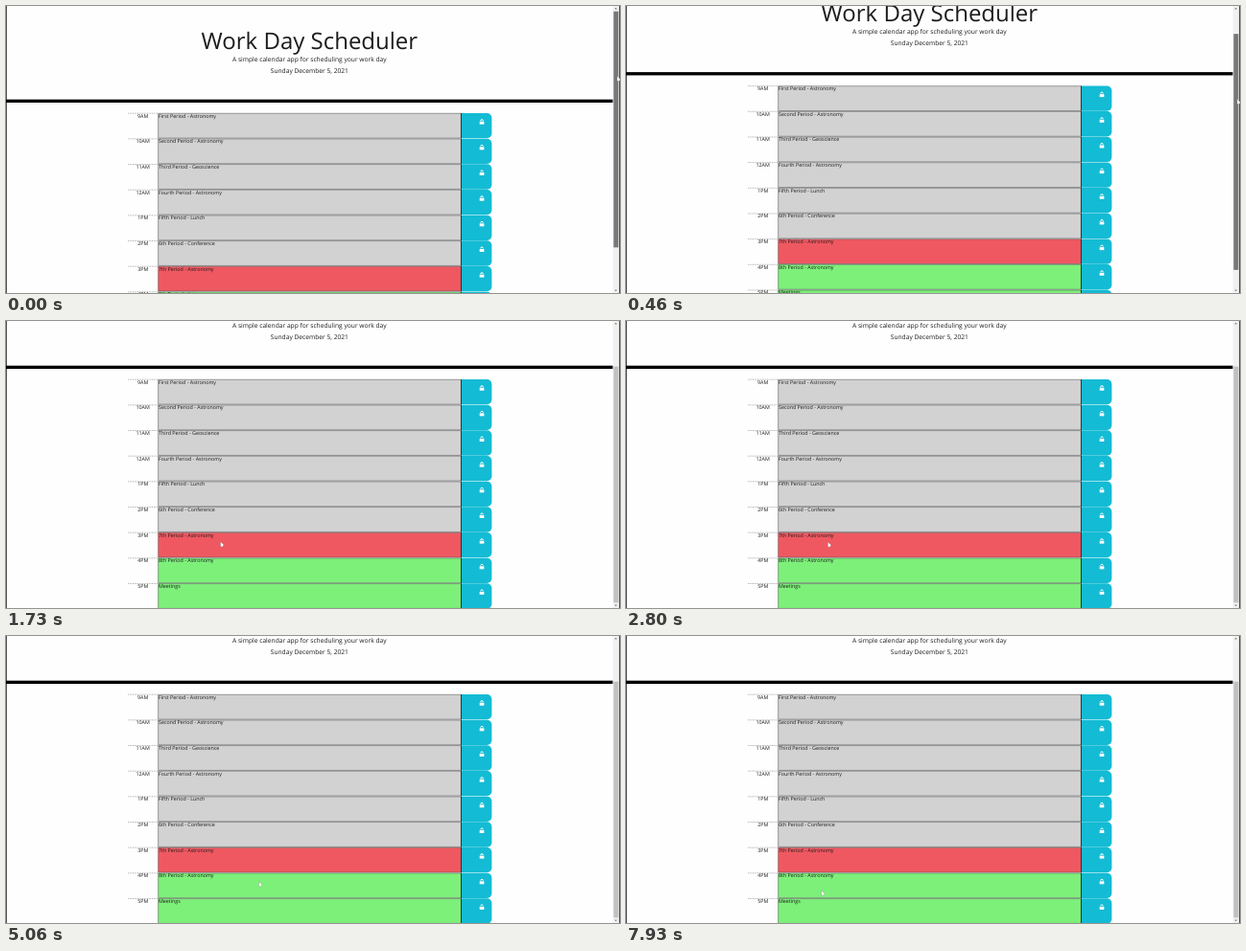
Animation, 640 px wide and 300 px high, one loop 8 s. Source, as an HTML page with a canvas:

```html
<!DOCTYPE html>
<html lang="en">
<head>
<meta charset="utf-8">
<title>Work Day Scheduler</title>
<style>
  html, body { margin: 0; width: 100%; height: 100%; overflow: hidden; background: #fefefe; }
  canvas { display: block; }
</style>
</head>
<body>
<canvas id="stage" width="640" height="300"></canvas>
<script>
// Drawn in the units of a 1920 x 900 screen shown at one third size.
const ctx = document.getElementById('stage').getContext('2d');
ctx.scale(1 / 3, 1 / 3);
ctx.textRendering = 'geometricPrecision';

const LOOP = 8000, VIEW = 900, MAX_SCROLL = 153, ROW = 80, CENTER = 949;
const PAST = '#d2d2d2', PRESENT = '#ef5861', FUTURE = '#7df07a', SAVE = '#14bbd4';
const NOW = 6;

const tasks = [
  'First Period - Astronomy', 'Second Period - Astronomy', 'Third Period - Geoscience',
  'Fourth Period - Astronomy', 'Fifth Period - Lunch', '6th Period - Conference',
  '7th Period - Astronomy', '8th Period - Astronomy', 'Meetings'
];

// The pointer reaches each stop at its time, after at most one TRAVEL.
const TRAVEL = 1300;
const stops = [
  { at: 0, x: 1911, y: 220 },
  { at: 860, x: 1911, y: 350 },
  { at: 1730, x: 671, y: 692 },
  { at: 3730, x: 470, y: 696 },
  { at: 5060, x: 791, y: 770 },
  { at: 5700, x: 1660, y: 650 },
  { at: 6600, x: 980, y: 124 },
  { at: 7900, x: 611, y: 798 }
];

const clamp = v => Math.min(1, Math.max(0, v));
const ease = k => k * k * (3 - 2 * k);

function pointerAt(t) {
  const to = stops.find(s => s.at > t) || stops.at(-1);
  const from = stops[stops.indexOf(to) - 1];
  const k = ease(clamp(1 - (to.at - t) / Math.min(TRAVEL, to.at - from.at)));
  return [from.x + (to.x - from.x) * k, from.y + (to.y - from.y) * k];
}

function rect(color, x, y, w, h) {
  ctx.fillStyle = color;
  ctx.fillRect(x, y, w, h);
}

function stroke(color, width) {
  ctx.strokeStyle = color;
  ctx.lineWidth = width;
  ctx.stroke();
}

function text(str, x, y, size, align = 'center') {
  ctx.font = `${size}px "Open Sans", sans-serif`;
  ctx.textAlign = align;
  ctx.fillStyle = '#1c1c1c';
  ctx.fillText(str, x, y);
}

function drawLock(x, y) {
  rect('#fff', x - 7, y - 1, 14, 9);
  ctx.beginPath();
  ctx.arc(x, y - 3, 4, Math.PI, 0);
  stroke('#fff', 3);
}

function drawRow(task, i, y) {
  const hour = i + 9;
  const label = hour > 12 ? `${hour - 12}PM` : `${hour}AM`;
  const color = i < NOW ? PAST : i > NOW ? FUTURE : PRESENT;

  ctx.setLineDash([3, 2]);
  ctx.beginPath();
  ctx.moveTo(381, y + 1.5);
  ctx.lineTo(474, y + 1.5);
  stroke('#222', 1);
  ctx.setLineDash([]);
  text(label, 428, y + 15, 16);

  ctx.beginPath();
  ctx.rect(476, y + 1.75, 947, ROW - 2.5);
  ctx.fillStyle = color;
  ctx.fill();
  stroke('#444', 1.5);
  text(task, 477, y + 15, 16, 'left');

  ctx.beginPath();
  ctx.roundRect(1424, y + 1, 95, ROW - 1, [0, 15, 15, 0]);
  ctx.fillStyle = SAVE;
  ctx.fill();
  rect('#000', 1423, y + 1, 2, ROW - 1);
  drawLock(1488, y + 28);
}

function drawScrollbar(scroll, held) {
  const button = 17, track = VIEW - 2 * button, scale = track / (VIEW + MAX_SCROLL);
  rect('#f1f1f1', 1898, 0, 19, VIEW);
  rect(held ? '#787878' : '#c1c1c1', 1900, button + scroll * scale, 15, VIEW * scale);
  for (const side of [-1, 1]) {
    const y = VIEW / 2 + side * (VIEW / 2 - 10);
    ctx.beginPath();
    ctx.moveTo(1903, y);
    ctx.lineTo(1911, y);
    ctx.lineTo(1907, y + side * 4);
    ctx.fillStyle = '#505050';
    ctx.fill();
  }
}

function drawPointer(x, y) {
  ctx.beginPath();
  ctx.moveTo(x, y);
  ctx.lineTo(x, y + 15);
  ctx.lineTo(x + 6, y + 16);
  ctx.lineTo(x + 10, y + 10);
  ctx.closePath();
  ctx.fillStyle = '#fff';
  ctx.fill();
  stroke('#777', 1);
}

function draw(now) {
  const t = now % LOOP;
  const scroll = MAX_SCROLL * clamp((t - 30) / 770);
  rect('#fefefe', 0, 0, 1920, VIEW);
  text('Work Day Scheduler', CENTER, 135 - scroll, 72);
  text('A simple calendar app for scheduling your work day', CENTER, 174 - scroll, 20);
  text('Sunday December 5, 2021', CENTER, 210 - scroll, 20);
  rect('#000', 0, 293 - scroll, 1898, 10);
  tasks.forEach((task, i) => drawRow(task, i, 335 + i * ROW - scroll));
  drawScrollbar(scroll, t < 930);
  rect('#000', 0, 0, 2, VIEW);
  rect('#000', 1918, 0, 2, VIEW);
  drawPointer(...pointerAt(t));
  requestAnimationFrame(draw);
}
requestAnimationFrame(draw);
</script>
</body>
</html>
```
